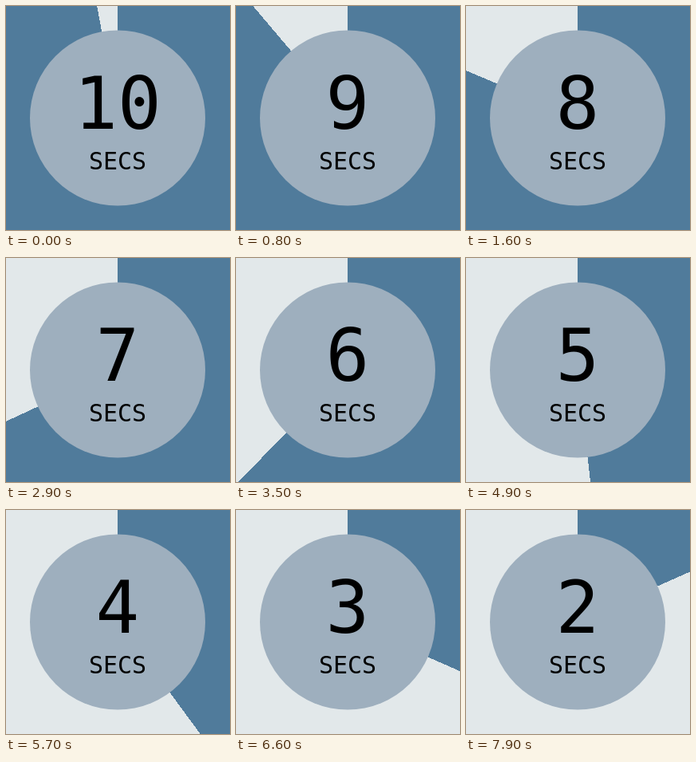
Recreate the animation shown at these times as an HTML page. Size 281 by 281 pixels, loop 8000 ms.

```html
<!DOCTYPE html>
<html lang="en">
<head>
<meta charset="utf-8">
<title>Countdown</title>
<style>
  html, body { margin: 0; width: 100%; height: 100%; overflow: hidden; }
  body {
    --edge: 349.5deg;
    background: conic-gradient(at 140px 140px, #507b9b var(--edge), #e2e8ea 0);
  }
  svg { display: block; }
  text { font-family: "DejaVu Sans Mono", monospace; text-anchor: middle; }
</style>
</head>
<body>
<svg width="281" height="281">
  <circle cx="140" cy="140.5" r="110" fill="#9eafbe"/>
  <text id="count" x="140" y="154" font-size="91">10</text>
  <text x="140" y="205" font-size="30">SECS</text>
</svg>
<script>
  const LOOP = 8000, FRAME = 100;
  const count = document.getElementById('count');

  function draw(now) {
    const frame = Math.floor((now % LOOP) / FRAME);
    // The wedge advances in twelve ticks per second.
    const tick = Math.floor((frame + 3) * 6 / 5);
    const swept = 1.5 + 2.984 * tick;
    document.body.style.setProperty('--edge', `${360 - swept}deg`);
    count.textContent = Math.round((97 - frame) / 10);
  }

  const start = performance.now();
  function loop() {
    draw(performance.now() - start);
    requestAnimationFrame(loop);
  }
  loop();
</script>
</body>
</html>
```
